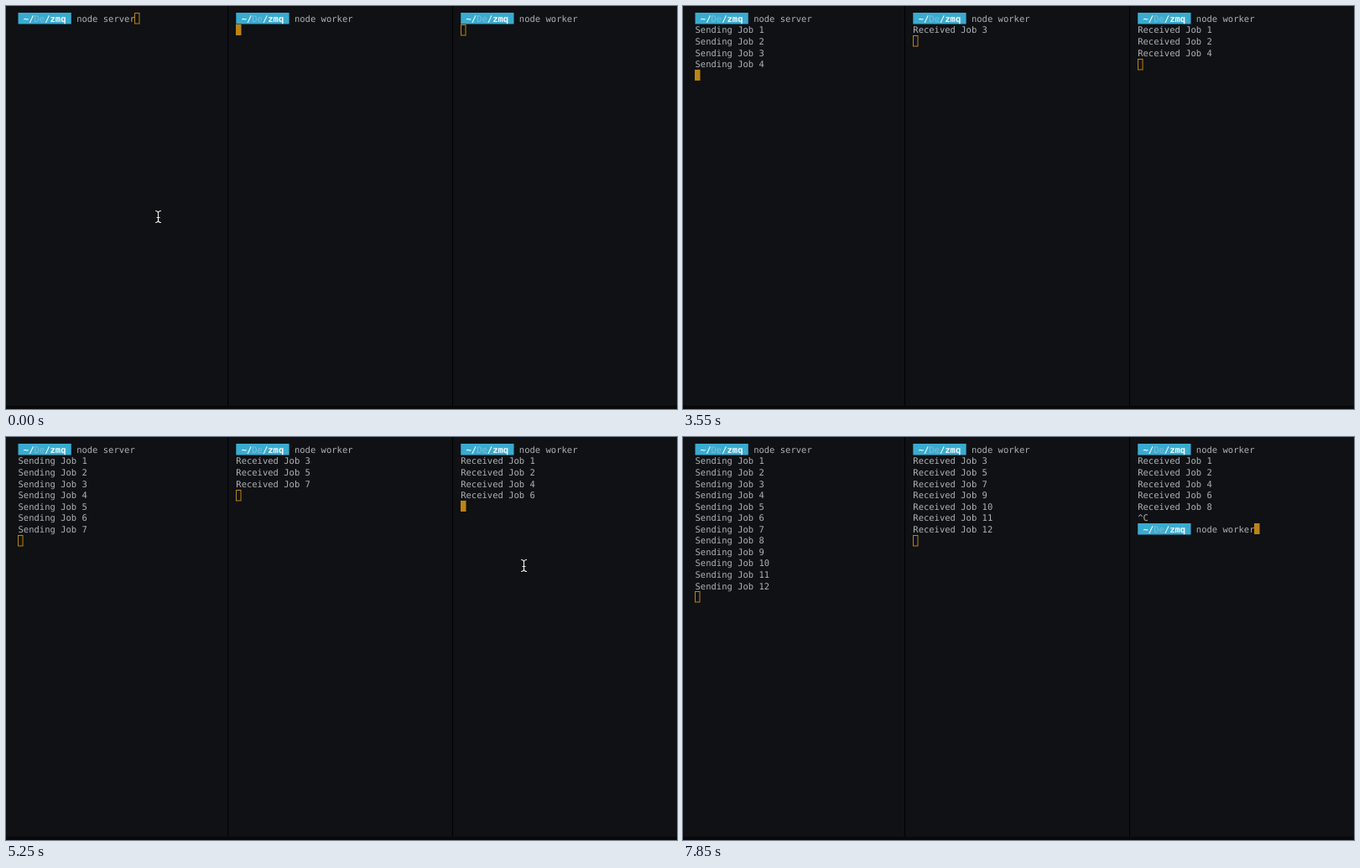
Recreate the animation shown at these times as an HTML page with a canvas. Size 800x481 px, loop 8000 ms.

```html
<!DOCTYPE html>
<html lang="en">
<head>
<meta charset="utf-8">
<title>Job queue terminals</title>
<style>
  html, body { margin: 0; width: 100%; height: 100%; overflow: hidden; background: #0f1115; }
  canvas { display: block; }
</style>
</head>
<body>
<canvas id="stage" width="800" height="481"></canvas>
<script>
const ctx = document.getElementById('stage').getContext('2d');
const LOOP = 8000, CW = 6.33, RH = 13.55, TOP = 8.3;
const PANES = [14.5, 274.3, 542.2];
const FONT = '10.5px "DejaVu Sans Mono", monospace';
const TEXT = '#b0b2b6', AMBER = '#bd8413';

// When each job is sent, and which pane receives it
const JOBS = [2000, 2500, 3000, 3550, 4050, 4550, 5000, 5500, 6000, 6500, 7050, 7550];
const TO = [2, 2, 1, 2, 1, 2, 1, 2, 1, 1, 1, 1];
const FOCUS_SERVER = 50, ENTER = 1850, FOCUS_WORKER = 5150, KILL = 6100, RECALL = 7650;

// Pointer path: time, x, y
const PATH = [[3950, 181, 251], [4150, 290, 212], [4300, 457, 174], [4400, 535, 160], [4700, 617, 153]];

// Each character sits on the terminal grid
function write(x, row, str, color = TEXT, bold = false) {
  ctx.font = (bold ? 'bold ' : '') + FONT;
  ctx.fillStyle = color;
  [...str].forEach((c, i) => {
    if (c !== ' ') ctx.fillText(c, x + i * CW, TOP + row * RH + 10.6);
  });
}

function prompt(x, row, command) {
  ctx.fillStyle = '#3aabd0';
  ctx.fillRect(x, Math.round(TOP + row * RH), 10 * CW, 13.5);
  write(x + CW, row, '~/', '#f4fafc', true);
  write(x + 3 * CW, row, 'De', '#78bfd8');
  write(x + 5 * CW, row, '/zmq', '#f4fafc', true);
  write(x + 11 * CW, row, command);
}

function cursor(x, row, focused) {
  const left = Math.round(x - 0.3), y = Math.round(TOP + row * RH);
  ctx.fillStyle = ctx.strokeStyle = AMBER;
  ctx.lineWidth = 1;
  if (focused) ctx.fillRect(left, y, 6.5, 13);
  else ctx.strokeRect(left + 0.5, y + 0.5, 5.5, 12.5);
}

function pointer(t) {
  if (t >= ENTER && t < PATH[0][0] || t >= RECALL) return;
  let [, x, y] = PATH[0];
  for (let i = 1; i < PATH.length; i++) {
    const [t0, x0, y0] = PATH[i - 1], [t1, x1, y1] = PATH[i];
    if (t < t0) break;
    const k = Math.min(1, (t - t0) / (t1 - t0));
    x = x0 + (x1 - x0) * k;
    y = y0 + (y1 - y0) * k;
  }
  ctx.save();
  ctx.translate(Math.round(x) + 0.5, Math.round(y) + 0.5);
  const beam = new Path2D('M-3.5-7Q0-7 0-4Q0-7 3.5-7M0-4V4M-3.5 7Q0 7 0 4Q0 7 3.5 7M-2 1H2');
  for (const [color, width] of [['#000', 2.6], ['#f0f0f0', 1.2]]) {
    ctx.strokeStyle = color;
    ctx.lineWidth = width;
    ctx.stroke(beam);
  }
  ctx.restore();
}

function draw(t) {
  ctx.fillStyle = '#0f1115';
  ctx.fillRect(0, 0, 800, 481);
  ctx.fillStyle = '#000';
  ctx.fillRect(264, 0, 1, 477);
  ctx.fillRect(532, 0, 1, 477);
  ctx.fillStyle = '#09090c';
  ctx.fillRect(0, 477, 800, 4);

  const focus = t < FOCUS_SERVER ? 1 : t < FOCUS_WORKER ? 0 : 2;
  const rows = [1, 1, 1];
  PANES.forEach((x, i) => prompt(x, 0, i ? 'node worker' : 'node server'));
  JOBS.forEach((at, i) => {
    if (t < at) return;
    const pane = TO[i];
    write(PANES[0], rows[0]++, 'Sending Job ' + (i + 1));
    write(PANES[pane], rows[pane]++, 'Received Job ' + (i + 1));
  });

  const cols = [0, 0, 0];
  if (t < ENTER) {
    rows[0] = 0;
    cols[0] = 22;
  }
  if (t >= KILL) {
    const command = t < RECALL ? '' : 'node worker';
    write(PANES[2], rows[2]++, '^C');
    prompt(PANES[2], rows[2], command);
    cols[2] = 11 + command.length;
  }
  PANES.forEach((x, i) => cursor(x + cols[i] * CW, rows[i], i === focus));
  pointer(t);
}

ctx.textRendering = 'geometricPrecision';
const start = performance.now();
function tick() {
  draw((performance.now() - start) % LOOP);
  requestAnimationFrame(tick);
}
tick();
</script>
</body>
</html>
```
